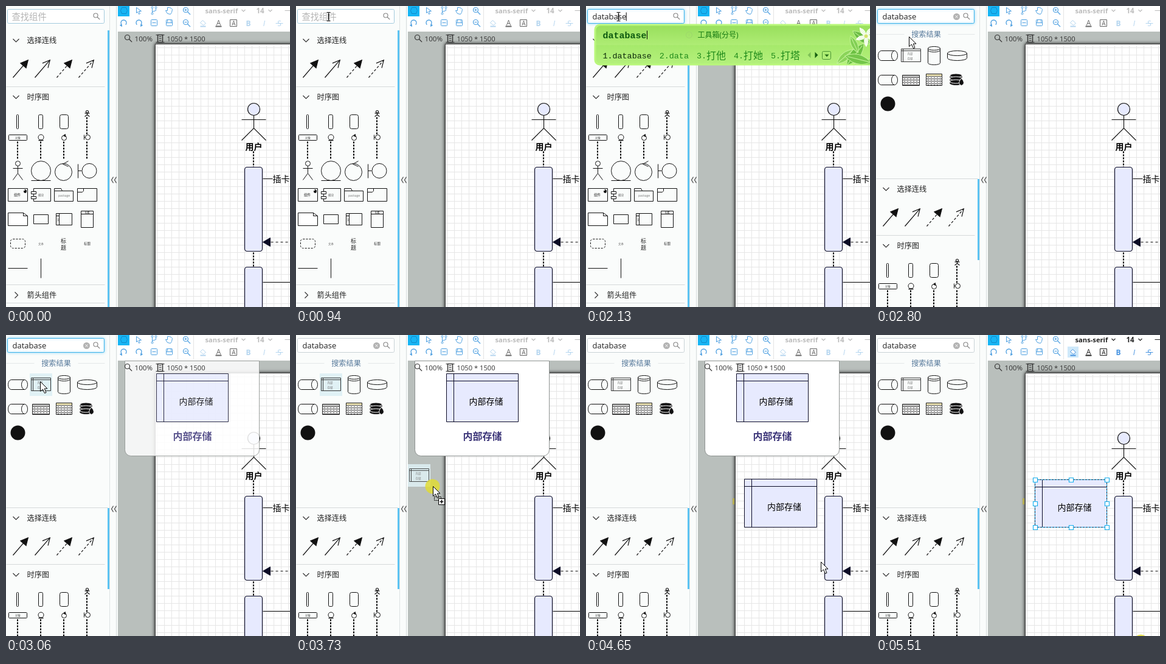
Write an HTML page with a canvas that moves like this. It is 467x494 px and loops after 5.58 s.

```html
<!DOCTYPE html>
<html lang="zh">
<head>
<meta charset="utf-8">
<style>
html,body{margin:0;width:100%;height:100%;overflow:hidden;background:#fff}
canvas{display:block}
</style>
</head>
<body>
<canvas id="stage" width="467" height="494"></canvas>
<script>
const c = document.getElementById('stage').getContext('2d');
const SANS = '"Open Sans","Noto Sans CJK SC","Noto Sans CJK",sans-serif';
const MONO = '"Liberation Mono","Noto Sans CJK SC","Noto Sans CJK",monospace';
const INK = '#111', NAVY = '#0b0b25', LILAC = '#e7eafe', BLUE = '#1bb0ee', ICON = '#4d9fe0';

// Strokes live on pixel centres (the context is shifted by half a pixel), fills on pixel edges.
const fill = (x, y, w, h, col) => { c.fillStyle = col; c.fillRect(x - .5, y - .5, w, h); };
function paint(stroke, bg, width = 1, dash = []) {
  if (bg) { c.fillStyle = bg; c.fill(); }
  if (!stroke) return;
  c.strokeStyle = stroke; c.lineWidth = width; c.setLineDash(dash); c.stroke(); c.setLineDash([]);
}
function poly(pts, stroke = INK, bg, width, dash) {
  c.beginPath();
  for (let i = 0; i < pts.length; i += 2) c.lineTo(pts[i], pts[i + 1]);
  if (bg) c.closePath();
  paint(stroke, bg, width, dash);
}
const line = (x1, y1, x2, y2, col, width, dash) => poly([x1, y1, x2, y2], col, null, width, dash);
const dots = (x, y1, y2) => line(x - .5, y1, x - .5, y2, '#000', 2, [3, 2]);
function box(x1, y1, x2, y2, r = 0, stroke = INK, bg, width, dash) {
  c.beginPath(); c.roundRect(x1, y1, x2 - x1, y2 - y1, r); paint(stroke, bg, width, dash);
}
function oval(x, y, rx, ry = rx, stroke = INK, bg, width, from = 0, to = 7) {
  c.beginPath(); c.ellipse(x, y, rx, ry, 0, from, Math.min(to, from + Math.PI * 2)); paint(stroke, bg, width);
}
function text(s, x, y, size, col, { weight = '', align = 'left', font = SANS } = {}) {
  c.font = `${weight} ${size}px ${font}`; c.textAlign = align; c.textBaseline = 'alphabetic';
  c.fillStyle = col; c.fillText(s, x, y + size * .36);
}
const mid = (s, x, y, size, col = '#222', weight) => text(s, x, y, size, col, { align: 'center', weight });
const chevron = (x, y, col = '#333', r = 5) => poly([x - r, y - r / 2, x, y + r / 2, x + r, y - r / 2], col, null, 1.2);
function lens(x, y, r, col, sign) {
  oval(x, y, r, r, col, null, 1.2);
  line(x + r * .7, y + r * .7, x + r * 1.9, y + r * 1.9, col, 1.3);
  if (sign) line(x - 2, y, x + 2, y, col);
  if (sign === '+') line(x, y - 2, x, y + 2, col);
}
function actor(x, top, r, hip, armY, arm, foot, bg, width) {
  oval(x, top + r, r, r, INK, bg, width);
  line(x, top + 2 * r, x, hip, INK, width);
  line(x - arm, armY, x + arm, armY, INK, width);
  poly([x - arm, foot, x, hip, x + arm, foot], INK, null, width);
}

// ---- timing ----
const LOOP = 5580;
const ODD_GAPS = { 3: 150, 4: 120, 5: 150, 15: 150, 17: 150, 24: 150, 26: 120, 27: 140, 30: 140, 41: 80 };
const starts = [0];
for (let i = 0; i < 42; i++) starts.push(starts[i] + (ODD_GAPS[i] || 130));

const ROUTE = [[1, 386, 425], [3, 200, 198], [5, 78, 65], [6, 53, 17], [18, 53, 17], [21, 54, 50], [22, 55, 72],
  [25, 58, 84], [27, 75, 112], [28, 225, 248], [30, 287, 303], [31, 300, 308], [35, 386, 372], [36, 386, 372],
  [38, 335, 290], [40, 328, 288], [41, 385, 400], [42, 436, 503]];
function pointerAt(step) {
  const n = ROUTE.findIndex(k => k[0] >= step), b = ROUTE[n], a = ROUTE[n - 1] || b;
  const p = b === a ? 0 : (step - a[0]) / (b[0] - a[0]);
  return [a[1] + (b[1] - a[1]) * p, a[2] + (b[2] - a[2]) * p].map(Math.round);
}
const within = (s, a, b) => s >= a && s <= b;
const TYPED = ['d', 'da', 'data', 'datab', 'databas', 'database'];

// ---- drawing page ----
function storage(x, y, w, h, inset, label, size, bg, ink = NAVY) {
  box(x, y, x + w, y + h, 0, ink, bg);
  line(x, y + inset, x + w, y + inset, ink);
  line(x + inset, y, x + inset, y + h, ink);
  if (label) mid(label, x + w / 2 + 6, y + h / 2 + 6, size, '#000');
}
function page() {
  const grid = 12;
  fill(184, 42, 283, 452, '#b9bfbc');
  c.save(); c.shadowColor = '#000'; c.shadowBlur = 6;
  fill(245, 62, 230, 440, '#444'); c.restore();
  fill(246, 63, 221, 431, '#fff');
  for (let x = 248; x < 467; x += grid) line(x, 63, x, 494, '#e6e6e6');
  for (let y = 68; y < 494; y += grid) line(246, y, 467, y, '#e6e6e6');
  actor(407, 159, 10, 200, 186, 20, 220, LILAC, 1.2);
  dots(407, 238, 264);
  mid('用户', 407, 230, 14, '#000', 'bold');
  box(392, 264, 421, 402, 4, NAVY, LILAC, 1.2);
  dots(407, 404, 428);
  box(392, 428, 421, 520, 4, NAVY, LILAC, 1.2);
  line(422, 283, 438, 283);
  text('插卡', 438, 283, 14, '#000');
  line(435, 387, 467, 387, INK, 1, [4, 4]);
  poly([422, 387, 434, 380, 434, 394], NAVY, NAVY);
  line(422, 453, 467, 453);
}
function preview(alpha) {
  c.save(); c.globalAlpha = alpha;
  box(195, 42, 416, 198, [0, 0, 10, 10], '#8d9290', '#fff');
  storage(247, 63, 118, 79, 12, '内部存储', 14, LILAC);
  mid('内部存储', 306, 166, 16, '#3b3478', 'bold');
  c.restore();
}
function status() {
  lens(199, 51, 4, '#333');
  text('100%', 211, 53, 11.6, '#333');
  box(249, 47, 257, 59, 0, '#333', null, 1.5);
  line(246, 47, 260, 47, '#333'); line(246, 59, 260, 59, '#333');
  for (let y = 50; y < 58; y += 3) line(251, y, 255, y, '#333');
  text('1050 * 1500', 264, 53, 11.2, '#333');
}
function dropped(selected) {
  const s = selected ? 1 : 0;
  fill(241, 268, 3, 10, '#b5ad52');
  storage(260 + s, 236 + s, 119 - s, 79 - s, 12, '内部存储', 14, LILAC);
  if (!selected) return;
  box(261, 237, 379, 315, 0, BLUE, null, 1, [3, 2]);
  for (const x of [261, 320, 379]) for (const y of [237, 276, 315])
    if (x !== 320 || y !== 276) box(x - 3, y - 3, x + 4, y + 4, 0, BLUE, '#fff', 1.2);
}

// ---- toolbar ----
function turnArrow(x, dir) {
  oval(x, 27, 4.5, 4.5, ICON, null, 1.3, Math.PI * .75, Math.PI * 2.25);
  poly([x + dir * 3.5, 30, x + dir * 6, 31, x + dir * 3, 33], ICON, ICON);
}
function formatTools(ink, blue, active) {
  text('sans-serif', 327, 7, 11.2, ink, { weight: 'bold' }); chevron(390, 7, ink, 3);
  text('14', 411, 7, 11.5, ink, { weight: 'bold' }); chevron(434, 7, ink, 3);
  line(458, 7, 467, 7, ink);
  if (active) fill(315, 19, 18, 18, '#cfe9fa');
  poly([319, 27, 323, 23, 328, 28, 324, 31], blue, '#fff');
  line(319, 33, 328, 33, blue, 2);
  const letter = active ? ink : '#666';
  mid('A', 349, 27, 12, letter); line(344, 33, 354, 33, letter, 2);
  box(368, 22, 379, 33, 0, letter); mid('A', 374, 28, 10, letter);
  mid('B', 398, 28, 12, blue, 'bold');
  mid('I', 424, 28, 12, blue, 'italic');
  mid('S', 449, 28, 12, blue); line(443, 28, 455, 28, blue);
}
function toolbar(step) {
  fill(182, 0, 285, 42, '#fff');
  fill(183, 0, 20, 17, '#17b5f4');
  poly([188, 7, 190, 2, 197, 2, 199, 7, 197, 12, 190, 12], '#1489c8', '#17b5f4');
  poly([214, 2, 222, 8, 218, 8, 220, 12, 218, 13, 216, 9, 214, 11], ICON, '#fff');
  line(240, 2, 240, 13, ICON); poly([240, 9, 246, 7, 246, 2], ICON);
  for (const [x, y] of [[240, 2], [246, 2], [240, 12]]) oval(x, y, 1.5, 1.5, ICON, '#fff');
  poly([265, 12, 262, 7, 265, 7, 265, 2, 268, 2, 271, 3, 273, 5, 272, 10, 270, 13], ICON, '#fff');
  turnArrow(193, -1); turnArrow(218, 1);
  box(238, 22, 248, 32, 1, ICON); line(240, 27, 246, 27, ICON);
  box(263, 22, 273, 32, 1, ICON); line(265, 22, 265, 26, ICON); line(271, 22, 271, 26, ICON); line(263, 27, 273, 27, ICON);
  lens(295, 6, 4, ICON, '+'); lens(295, 26, 4, ICON, '-');
  line(282, 0, 282, 40, '#e4e4e4'); line(308, 0, 308, 40, '#e4e4e4');
  if (step >= 41) formatTools('#222', '#4793e0', true);
  else if (step === 40) formatTools('#777', '#78b4ea', true);
  else formatTools('#bcbcbc', '#b4d5ef', false);
}

// ---- component library ----
function connector(x, y, dashed, solid) {
  c.save(); c.translate(x, y); c.rotate(Math.atan2(-29, 25));
  line(0, 0, 37, 0, INK, 1.2, dashed ? [4, 3] : []);
  poly([26, -6, 38, 0, 26, 6], INK, solid && INK, 1.2);
  c.restore();
}
function header(name, y, open = true) {
  if (open) chevron(16, y); else poly([14, y - 5, 19, y, 14, y + 5], '#333', null, 1.2);
  text(name, 34, y, 12.2, '#222');
}
function library(dy) {
  c.save(); c.translate(0, dy);
  header('选择连线', 56);
  [0, 1, 2, 3].forEach(i => connector(11 + i * 36, 117, i > 1, i % 2 === 0));
  line(0, 132, 162, 132, '#d5d9da');
  header('时序图', 149);

  box(17, 178, 20, 201, 1); box(53, 178, 60, 201, 2); box(88, 178, 102, 201, 3);
  actor(133, 171, 2, 178, 175.5, 4, 181, null, 1.2); dots(133, 182, 210);
  box(4, 211, 34, 220, 1); mid('对象', 19, 216, 4.5, '#444');
  [19, 57, 95, 133].forEach(x => dots(x, 222, 250));
  oval(57, 215, 4.5); line(53, 220, 61, 220, INK, 1.5);
  oval(95, 216, 4); poly([97, 210, 94, 212, 97, 214], INK, INK);
  oval(134, 215, 4); line(128, 211, 128, 219); line(128, 215, 130, 215);

  actor(19, 254, 4, 274, 266, 8, 285);
  oval(57, 270, 16); line(41, 286, 73, 286);
  oval(94, 272, 14); poly([102, 254, 93, 259, 102, 263]);
  line(118, 259, 118, 282); line(118, 270, 124, 270); oval(136.5, 270, 12);

  box(3, 299, 35, 320); mid('组件', 18, 310, 5.5);
  box(29, 301, 33, 306, 2, INK, INK); line(28, 302, 31, 302, '#fff');
  box(45, 299, 73, 320); mid('模块', 57, 310, 4.5, '#666');
  box(41, 304, 49, 308, 0, INK, '#fff'); box(41, 312, 49, 316, 0, INK, '#fff');
  poly([79, 303, 79, 299, 90, 299, 92, 303]); box(79, 303, 110, 320); mid('package', 95, 311, 5, '#777');
  box(117, 299, 149, 320); poly([117, 305, 125, 305, 127, 303, 127, 299]);

  poly([3, 339, 28, 339, 35, 344, 35, 360, 3, 360], INK, '#fff'); poly([28, 339, 28, 344, 35, 344]);
  box(45, 342, 69, 357);
  box(82, 340, 108, 359); line(87, 340, 87, 359); line(82, 344, 87, 344); mid('文', 85, 351, 4);
  box(123, 336, 143, 363); line(123, 341, 143, 341); mid('标题', 133, 339, 4);

  box(7, 382, 31, 397, 4, INK, null, 1, [3, 2]);
  mid('文本', 57, 390, 4.5, '#666');
  mid('标', 94, 385, 9); mid('题', 94, 396, 9);
  mid('标题', 133, 390, 5.5, '#333');
  line(3, 430, 35, 430); line(57, 414, 57, 446);

  line(0, 457, 162, 457, '#d5d9da');
  header('箭头组件', 474, false);
  line(0, 487, 162, 487, '#d5d9da');
  c.restore();
}
function tube(y) {
  poly([30, y - 8, 8, y - 8]); poly([30, y + 8, 8, y + 8]);
  oval(8, y, 5, 8, INK, null, 1, Math.PI / 2, Math.PI * 1.5);
  oval(30, y, 5, 8);
}
function can(x, y, rx, ry, h, rings = 1) {
  line(x - rx, y, x - rx, y + h); line(x + rx, y, x + rx, y + h);
  oval(x, y + h, rx, ry, INK, null, 1, 0, Math.PI);
  for (let i = 1; i < rings; i++) oval(x, y + i * 3, rx, ry, INK, null, 1, 0, Math.PI);
  oval(x, y, rx, ry);
}
function sheet(x1, y1, x2, y2, tint) {
  box(x1, y1, x2, y2, 0, '#222', '#fff');
  fill(x1 + 1, y1 + 1, x2 - x1 - 1, 3, tint);
  for (let y = y1 + 4; y < y2; y += 4) line(x1, y, x2, y, '#555');
  for (let y = y1 + 6; y < y2; y += 4) line(x1 + 2, y, x2 - 2, y, '#666', 1, [3, 2]);
}
function storageItem(x, y, hover) {
  if (hover) fill(x, y, 37, 37, '#e0f1f5');
  storage(x + 2, y + 7, 32, 21, 3, '', 0, null, '#333');
  text('内部', x + 12, y + 15, 4.5, '#777'); text('存储', x + 12, y + 23, 4.5, '#777');
}
function results(hover) {
  line(0, 46, 46, 46, '#e3e7e8'); line(118, 46, 162, 46, '#e3e7e8');
  mid('搜索结果', 82, 46, 12.2, '#56789a');
  tube(81); tube(121);
  storageItem(39, 63, hover);
  can(95, 69, 10, 3, 24, 2);
  can(133, 77, 16, 4, 8);
  sheet(43, 113, 71, 130, '#bbb'); sheet(82, 111, 108, 130, '#e8dfb0');
  for (const y of [114, 119, 124]) {
    oval(131, y + 2, 10, 3, INK, INK);
    oval(131, y - .5, 10, 3, '#fff', INK);
  }
  c.beginPath(); c.moveTo(140, 118); c.quadraticCurveTo(148, 127, 140, 130); c.quadraticCurveTo(132, 127, 140, 118);
  paint('#fff', INK);
  oval(19, 160, 12, 12, null, INK);
}
function searchBox(step) {
  const focus = within(step, 9, 26), typed = TYPED[Math.min(step - 11, 5)];
  c.save();
  if (focus) { c.shadowColor = '#8fd6f7'; c.shadowBlur = 4; }
  box(2, 5, 161, 28, 2, focus ? '#3db2e9' : step < 9 ? '#a3cbdd' : '#c9d2d6', '#fff');
  c.restore();
  if (typed) text(typed, 10, 17, 13, '#222'); else text('查找组件', 9, 17, 14.3, '#b5b5b5');
  if (within(step, 9, 17)) { const x = typed ? 10 + c.measureText(typed).width : 9; line(x, 10, x, 24, '#000'); }
  lens(147, 15, 3.5, '#888');
  if (step < 18) return;
  oval(132, 17, 5.5, 5.5, null, '#b3b3b3');
  line(130, 15, 134, 19, '#fff'); line(134, 15, 130, 19, '#fff');
}
function sidebar(step) {
  const found = step >= 18, top = found ? 284 : 40;
  fill(0, 0, 184, 494, '#fafcfb');
  line(170, 0, 170, 494, '#dde2e3'); line(181, 0, 181, 494, '#d5dadb');
  if (found) { results(within(step, 22, 30)); line(0, 283, 167, 283, '#d5d9da'); }
  library(found ? 244 : 0);
  fill(167, top, 3, found ? 133 : 454, '#5cc3f2');
  for (const x of [173, 178]) poly([x + 3, 280, x, 285, x + 3, 290], '#444', null, 1.2);
  searchBox(step);
}

// ---- input method window ----
function leaf(x, y, length, angle, col, edge = '#c4f39a') {
  c.save(); c.translate(x, y); c.rotate(angle);
  c.beginPath(); c.moveTo(0, 0);
  c.quadraticCurveTo(length / 2, -length * .35, length, 0); c.quadraticCurveTo(length / 2, length * .35, 0, 0);
  paint(edge, col); line(0, 0, length * .9, 0, edge);
  c.restore();
}
function inputMethod(typed) {
  const g = c.createLinearGradient(0, 31, 0, 95);
  g.addColorStop(0, '#98df5c'); g.addColorStop(.5, '#aeec74'); g.addColorStop(.52, '#a6e96b'); g.addColorStop(1, '#b4f07c');
  box(13, 29, 480, 97, 9, null, '#b9f77b');
  box(16, 32, 480, 94, 7, null, g);
  c.save(); c.beginPath(); c.rect(405, 31, 62, 64); c.clip();
  leaf(412, 94, 36, -.7, '#8bd45a'); leaf(428, 97, 46, -.9, '#6cc043'); leaf(440, 96, 34, -.2, '#7acb4c');
  leaf(447, 76, 30, -2, '#82cf54'); leaf(467, 62, 36, -2.5, '#6abb43'); leaf(468, 92, 44, -2.9, '#74c64a');
  for (let i = 0; i < 5; i++) leaf(460, 49, 17, i * 1.257 + .3, '#e9fbd8', '#fff');
  oval(460, 49, 3, 3, null, '#d5e56b');
  c.restore();
  text(typed, 27, 47, 15, '#0d5a10', { weight: 'bold', font: MONO });
  const end = 28 + c.measureText(typed).width;
  line(end, 40, end, 54, '#000');
  oval(169, 47, 5, 5, '#9ed76c'); mid('i', 169, 47, 8, '#9ed76c');
  text('工具箱(分号)', 183, 47, 12, '#157a12');
  const words = typed.length < 4 ? ['大', '打', '搭', '达', '答'] : [typed, 'data', '打他', '打她', '打塔'];
  let x = 27;
  words.forEach((word, i) => {
    const col = i ? '#1f8a1a' : '#0c2a0a', size = word > '~' ? 16 : 13.4;
    text(i + 1 + '.', x, 81, 13.4, col, { font: MONO });
    text(word, x + 16, 81, size, col, { font: MONO });
    x += 29 + c.measureText(word).width;
  });
  poly([364, 80, 369, 75, 369, 85], null, '#7fc157');
  poly([381, 80, 376, 75, 376, 85], null, '#176010');
  box(388, 74, 402, 87, 2, '#4b9434'); poly([392, 79, 399, 79, 395.5, 83], null, '#236a17');
}

// ---- pointer ----
function pointer(step) {
  if (!step) return;
  const [x, y] = pointerAt(step), drag = within(step, 27, 30);
  if (drag) { c.save(); c.globalAlpha = .85; storageItem(x - 41, y - 36, true); c.restore(); }
  if (step === 8 || within(step, 25, 30) || step === 39 || step === 42) oval(x - 1, y, 12, 12, null, 'rgba(226,220,48,.82)');
  if (within(step, 6, 18)) {
    line(x, y - 6, x, y + 6, '#000', 1.5);
    line(x - 3, y - 7, x + 3, y - 7, '#000'); line(x - 3, y + 7, x + 3, y + 7, '#000');
    return;
  }
  c.save(); c.translate(x, y);
  poly([0, 0, 0, 16, 4, 12.5, 7, 19, 9.5, 18, 6.8, 11.5, 11.5, 11.5], '#000', '#fff');
  if (drag) {
    box(2, 17, 13, 23, 0, '#000', null, 1, [2, 1]);
    box(9, 20, 19, 30, 0, '#000', '#fff');
    line(11, 25, 17, 25, '#000', 1.5); line(14, 22, 14, 28, '#000', 1.5);
  }
  c.restore();
}

function draw(step) {
  c.setTransform(1, 0, 0, 1, .5, .5);
  page();
  if (step >= 31) dropped(step >= 39);
  if (within(step, 22, 35)) preview([.5, .85][step - 22] || 1);
  status();
  toolbar(step);
  sidebar(step);
  if (within(step, 11, 16)) inputMethod(TYPED[step - 11]);
  pointer(step);
}

let shown = -1;
function tick() {
  const t = performance.now() % LOOP, step = starts.findLastIndex(s => s <= t);
  if (step !== shown) draw(shown = step);
  requestAnimationFrame(tick);
}
tick();
</script>
</body>
</html>
```
